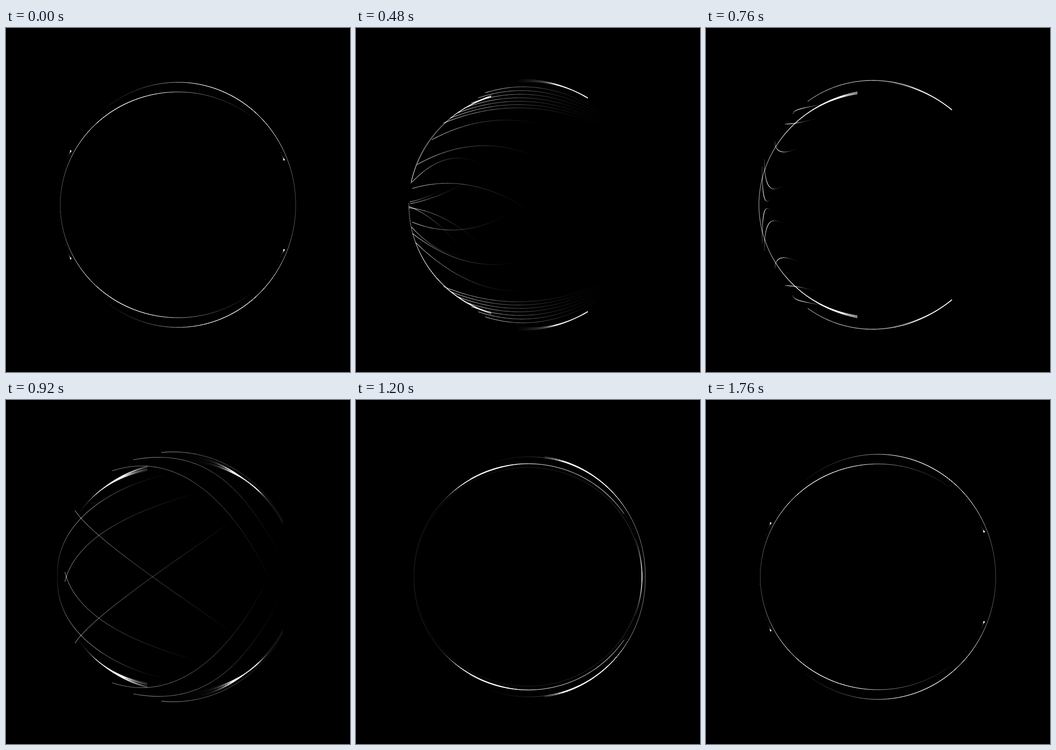
An HTML page with a canvas that plays this animation: 748 px wide and 748 px high, repeating every 1.8 s.

```html
<!DOCTYPE html>
<html>
<head>
<meta charset="utf-8">
<style>
html, body { margin: 0; width: 100%; height: 100%; overflow: hidden; background: #000; }
canvas { display: block; width: 748px; height: 748px; }
</style>
</head>
<body>
<canvas id="c" width="748" height="748"></canvas>
<script>
const g = document.getElementById('c').getContext('2d');
const LOOP = 1800, STEP = 40, SEG = 48, HAIRS = 12;
const CX = 374, CY = 384.5, RAD = Math.PI / 180;

const mix = (a, b, k) => a + (b - a) * k;
const clamp = (v) => Math.max(0, Math.min(1, v));
const noise = (i) => { const v = Math.sin(i * 91.7 + 3) * 4375.5; return (v - Math.floor(v)) * 2 - 1; };

// Light along a line, u in 0..1
const fade = (level, power = 1) => (u) => level * (1 - u) ** power;
const peak = (at, width, level, floor = 0) => (u) =>
  level * Math.exp(-(((u - at) / width) ** 2)) + floor * Math.min(1, u * 4);

function trace(point, light) {
  return Array.from({ length: SEG + 1 }, (_, i) => [...point(i / SEG), light(i / SEG)]);
}

// Elliptic arc in degrees whose radii may drift on the way
function arc(a0, a1, rx0, rx1, ry0, ry1, light) {
  return trace((u) => {
    const a = mix(a0, a1, u) * RAD;
    return [CX + mix(rx0, rx1, u) * Math.cos(a), CY - mix(ry0, ry1, u) * Math.sin(a)];
  }, light);
}

function bezier(p, light) {
  const axis = (k, u) => {
    const v = 1 - u;
    return v * v * v * p[k] + 3 * v * v * u * p[k + 2] + 3 * v * u * u * p[k + 4] + u * u * u * p[k + 6];
  };
  return trace((u) => [axis(0, u), axis(1, u)], light);
}

// Line that leaves the rim, arches over and dies out
function flow(x, y, dx, dy, bend = .18, light = fade(.75, 1.6)) {
  const lift = bend * dx;
  return bezier([x, y, x + dx * .33, y + dy * .33 - lift,
    x + dx * .67, y + dy * .67 - lift, x + dx, y + dy], light);
}

function hook(x, y, dx, dy) {
  const low = y + dy + 12;
  return bezier([x, y, x, low, x + dx * .45, low, x + dx, y + dy], peak(.4, .35, .9));
}

// Hairs along one arc, spread s0 px at the start and s1 px (crossed over) at the end
function brush({ a, rx, ry, s0 = 0, s1 = 0, at, width, level, floor = 0, jitter = 0 }) {
  return Array.from({ length: HAIRS }, (_, i) => {
    const j = i / (HAIRS - 1) * 2 - 1;
    return arc(a[0], a[1], rx[0], rx[1], ry[0] + j * s0, ry[1] - j * s1,
      peak(at + jitter * noise(i), width, level * (1 + .35 * noise(i + 40)), floor));
  });
}

const blend = (a, b, k) => a.map((p, i) => p.map((v, j) => mix(v, b[i][j], k)));
const layers = (a, b, n) => Array.from({ length: n }, (_, i) => blend(a, b, i / (n - 1)));
const flip = (list) => list.map((c) => c.map(([x, y, l]) => [x, 2 * CY - y, l]));
const both = (top) => ({ top, bottom: flip(top) });

function ringScene() {
  const light = { at: .57, width: .2, level: .17, floor: .025, rx: [256, 256] };
  return both([
    ...brush({ ...light, a: [136, 0], ry: [266.5, 266.5] }),
    ...brush({ ...light, a: [44, 180], ry: [245.5, 245.5] })
  ]);
}

function sprayScene() {
  const right = brush({ a: [96, 60], rx: [260, 260], ry: [270, 268], s0: 4, s1: 1,
    at: .82, width: .25, level: .45, floor: .06, jitter: .15 });
  const left = { a: [108, 169], rx: [259, 259], ry: [248, 248], s0: 2, s1: 7, jitter: .05 };
  const sheet = layers(flow(281, 141, 284, 64), flow(190, 207, 360, 15, .15), 7);
  const top = [
    ...right,
    ...brush({ ...left, at: .12, width: .13, level: .4, floor: .1 }),
    ...sheet,
    flow(165, 243, 250, -29, .14), flow(133, 297, 282, -6), flow(122, 335, 160, -33, .28),
    flow(122, 349, 286, 71), flow(118, 382, 129, -52, -.07), flow(117, 378, 71, -28, -.07)
  ];
  const bottom = [
    ...right,
    ...brush({ ...left, a: [108, 181], s1: 3, at: .22, width: .4, level: .22, floor: .04 }),
    ...sheet,
    flow(130, 302, 245, -103), flow(123, 322, 247, -56), flow(121, 336, 114, -62),
    flow(122, 347, 234, 33), flow(115, 378, 170, -94, -.15), flow(115, 381, 120, -99, -.15)
  ];
  return { top, bottom: flip(bottom) };
}

function hookScene() {
  return both([
    ...brush({ a: [100, 52], rx: [260, 261], ry: [270, 262], s0: 4, s1: .5,
      at: .95, width: .35, level: .4, jitter: .12 }),
    ...brush({ a: [100, 180], rx: [258, 259], ry: [247, 248], s0: 3, s1: 5,
      at: .14, width: .3, level: .32, floor: .07, jitter: .08 }),
    arc(126, 52, 260, 261, 278, 262, peak(.5, 1, .8)),
    hook(189, 188, 76, -26), hook(171, 209, 66, -12), hook(150, 246, 48, 16),
    hook(127, 285, 39, 59), hook(122, 300, 19, 71)
  ]);
}

function crossScene() {
  const soft = fade(.55, .9);
  return both([
    ...brush({ a: [92, 28], rx: [258, 258], ry: [260, 252], s0: 13, s1: 9,
      at: .54, width: .14, level: .55, floor: .03, jitter: .07 }),
    ...brush({ a: [105, 165], rx: [258, 258], ry: [244, 254], s0: 6, s1: 7,
      at: .25, width: .2, level: .5, jitter: .08 }),
    arc(98, 30, 260, 260, 273, 260, soft),
    bezier([277, 130, 436, 100, 521, 198, 594, 335], soft),
    bezier([231, 154, 394, 101, 511, 258, 574, 390], soft),
    bezier([150, 240, 190, 305, 423, 455, 490, 505], soft),
    bezier([128, 395, 155, 287, 305, 234, 412, 203], soft),
    bezier([112, 384, 106, 249, 262, 179, 345, 164], peak(.4, .35, .55))
  ]);
}

function gatherScene() {
  return both([
    ...brush({ a: [82, 0], rx: [260, 255], ry: [263, 262], s0: 2, s1: 2,
      at: .28, width: .18, level: .5, floor: .05 }),
    ...brush({ a: [90, 180], rx: [254, 248], ry: [246, 240], s0: 1, s1: 1,
      at: .26, width: .14, level: .5, floor: .012 }),
    arc(120, 22, 252, 252, 246, 246, peak(.3, .4, .8)),
    arc(89, 34, 252, 252, 246, 245, peak(.8, .4, .6)),
    arc(20, -22, 248, 248, 248, 248, peak(.4, .3, .7)),
    arc(112, 65, 258, 258, 260, 262, peak(1, .4, .5, .08)),
    arc(0, 180, 247, 247, 238, 238, fade(.25))
  ]);
}

const ring = ringScene();
const KEYS = [
  [0, ring], [200, ring], [480, sprayScene()], [760, hookScene()],
  [920, crossScene()], [1200, gatherScene()], [1640, ring], [LOOP, ring]
];

function stroke(c, level) {
  for (let i = 0; i < SEG; i++) {
    const a = clamp(level * (c[i][2] + c[i + 1][2]) / 2);
    if (a < .004) continue;
    g.globalAlpha = a;
    g.lineWidth = .9 + .5 * a;
    g.beginPath();
    g.moveTo(c[i][0], c[i][1]);
    g.lineTo(c[i + 1][0], c[i + 1][1]);
    g.stroke();
  }
}

function morph(from, to, k) {
  const n = Math.max(from.length, to.length);
  for (let i = 0; i < n; i++) {
    if (from[i] && to[i]) stroke(blend(from[i], to[i], k), 1);
    else if (from[i]) stroke(from[i], 1 - k);
    else stroke(to[i], k);
  }
}

// Points that creep towards two rest angles, slower as gap shrinks
function sparks(t) {
  const s = t > 1000 ? t - LOOP : t;
  const level = s < 0 ? clamp((s + 480) / 200) : clamp(1 - (s - 200) / 140);
  if (!level) return;
  const gap = Math.max(.002, .1 - .00047 * s), k = clamp(s / 200);
  const dot = (angle, r, e) => {
    const size = e < .45 ? 1.7 : 1.1;
    const x = CX + r * Math.cos(angle * RAD), y = r * Math.sin(angle * RAD);
    g.globalAlpha = level * .36;
    for (const side of [-1, 1]) g.fillRect(x - size / 2, CY + side * y - size / 2, size, size);
  };
  for (let n = 0; n < 320; n++) {
    const e = 1 / (mix(.057, .017, k) + n * gap);
    const f = 1 / (mix(.043, .022, k) + n * gap);
    dot(22.9 + e, 250.5 - .03 * e, e);
    dot(180 - 26.8 + f, 261 - .12 * f, f);
  }
}

function draw(t) {
  g.globalCompositeOperation = 'source-over';
  g.globalAlpha = 1;
  g.fillStyle = '#000';
  g.fillRect(0, 0, 748, 748);
  g.globalCompositeOperation = 'lighter';
  g.strokeStyle = g.fillStyle = '#fff';
  let i = 0;
  while (i < KEYS.length - 2 && t >= KEYS[i + 1][0]) i++;
  const [t0, a] = KEYS[i], [t1, b] = KEYS[i + 1];
  let k = (t - t0) / (t1 - t0);
  k = b === ring ? 1 - (1 - k) ** 3 : k * k * (3 - 2 * k);
  morph(a.top, b.top, k);
  morph(a.bottom, b.bottom, k);
  sparks(t);
}

const start = performance.now();
function tick() {
  const t = (performance.now() - start) % LOOP;
  draw(Math.floor(t / STEP) * STEP);
  requestAnimationFrame(tick);
}
tick();
</script>
</body>
</html>
```
